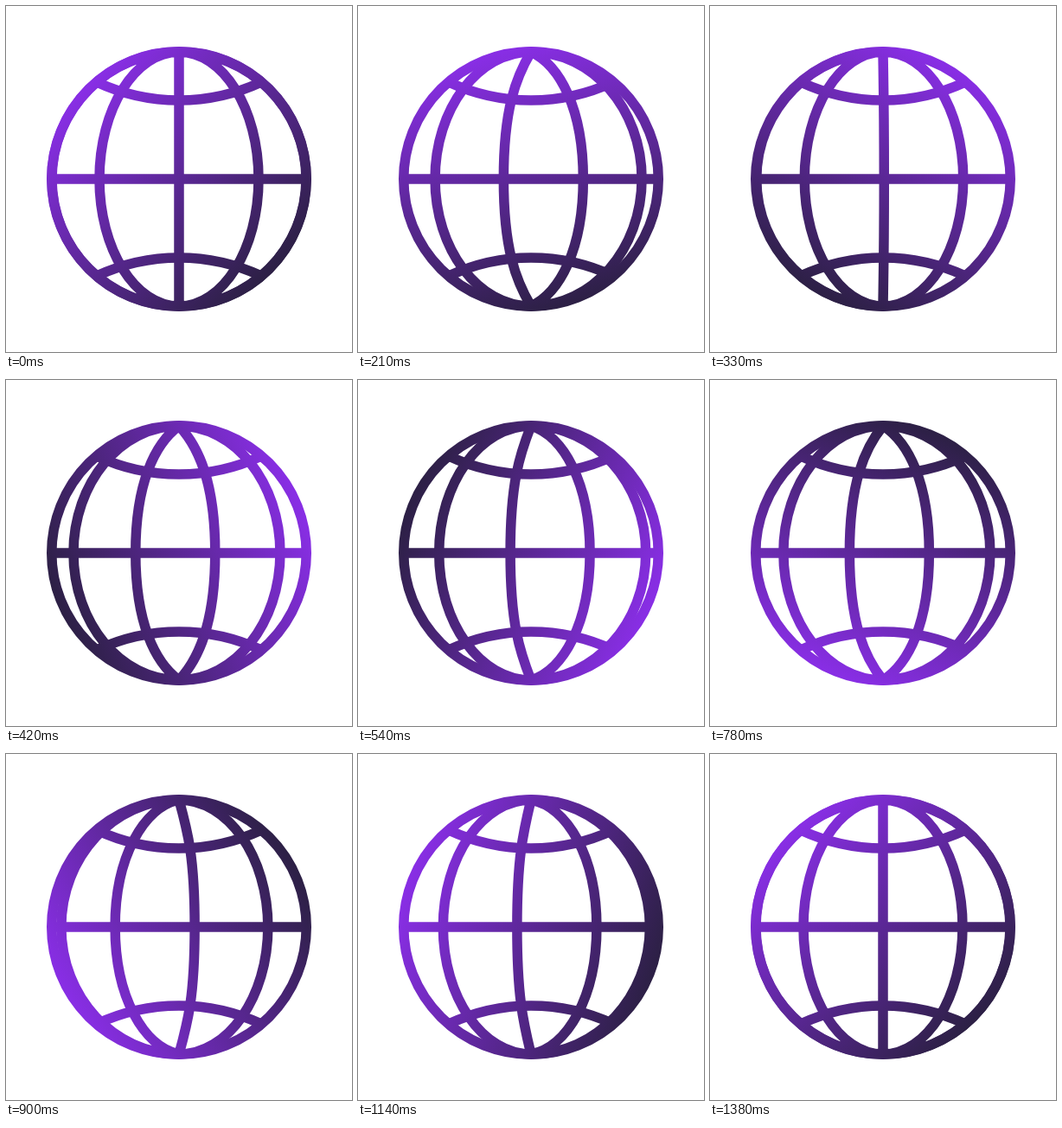
Write an HTML page that moves like this. It is 400 px wide and 400 px high and loops after 3410 ms.

```html
<!DOCTYPE html>
<html lang="en">
<head>
<meta charset="utf-8">
<title>Spinning globe</title>
<style>
  html, body { margin: 0; width: 100%; height: 100%; overflow: hidden; background: #fff; }
  svg { display: block; width: 100vw; height: 100vh; }
</style>
</head>
<body>
<svg viewBox="-200 -200 400 400">
  <defs>
    <linearGradient id="shade" gradientUnits="userSpaceOnUse" x1="-106" y1="-106" x2="106" y2="106">
      <stop offset="0" stop-color="#882ee4"/>
      <stop offset="1" stop-color="#2d2046"/>
    </linearGradient>
  </defs>
  <g fill="none" stroke="url(#shade)" stroke-width="11.5">
    <circle r="147.25"/>
    <path d="M-147 0H147M-95 -112A225 225 0 0 0 95 -112M-95 112A225 225 0 0 1 95 112"/>
    <path id="meridians"/>
  </g>
</svg>
<script>
const LOOP = 3410, STEP = 30;
const R = 147, INNER = 92, K = 0.552;
const shade = document.getElementById('shade');
const meridians = document.getElementById('meridians');

// [time in ms, value]
const spin = [[0, 0], [210, 0.344], [420, 1.546], [660, 2.913], [900, 3.803], [1140, 4.175], [1380, 4]];
const turn = [[0, 0], [210, 28], [420, 112], [660, 205], [900, 285], [1140, 335], [1380, 360]];

// Smooth curve through the keys, at rest at both ends
function ease(keys, t) {
  const last = keys.length - 1;
  if (t >= keys[last][0]) return keys[last][1];
  const rate = i => (keys[i + 1][1] - keys[i][1]) / (keys[i + 1][0] - keys[i][0]);
  const slope = i => i === 0 || i === last ? 0 : (rate(i - 1) + rate(i)) / 2;
  let i = 0;
  while (t >= keys[i + 1][0]) i++;
  const [t0, a] = keys[i], [t1, b] = keys[i + 1];
  const d = t1 - t0, s = (t - t0) / d, q = 1 - s;
  return a * q * q * (1 + 2 * s) + b * s * s * (3 - 2 * s)
    + d * s * q * (slope(i) * q - slope(i + 1) * s);
}

// u runs from -2 (left rim) through 0 (straight) to 2 (right rim)
function meridian(u) {
  const n = Math.abs(u);
  const x = Math.sign(u) * (n < 1 ? n * INNER : INNER + (n - 1) * (R - INNER));
  const poleY = R - Math.max(0, 1 - n) * 45;
  const c = x * K, h = R * K;
  return `M0 ${-R}C${c} ${-poleY} ${x} ${-h} ${x} 0S${c} ${poleY} 0 ${R}`;
}

function draw(now) {
  const t = Math.floor((now % LOOP) / STEP) * STEP;
  const part = ease(spin, t) % 1;
  let d = '';
  for (let k = -2; k <= 2; k++) {
    if (k - part >= -2) d += meridian(k - part);
  }
  meridians.setAttribute('d', d);
  shade.setAttribute('gradientTransform', `rotate(${ease(turn, t)})`);
}

const start = performance.now();
function tick() {
  draw(performance.now() - start);
  requestAnimationFrame(tick);
}
tick();
</script>
</body>
</html>
```
